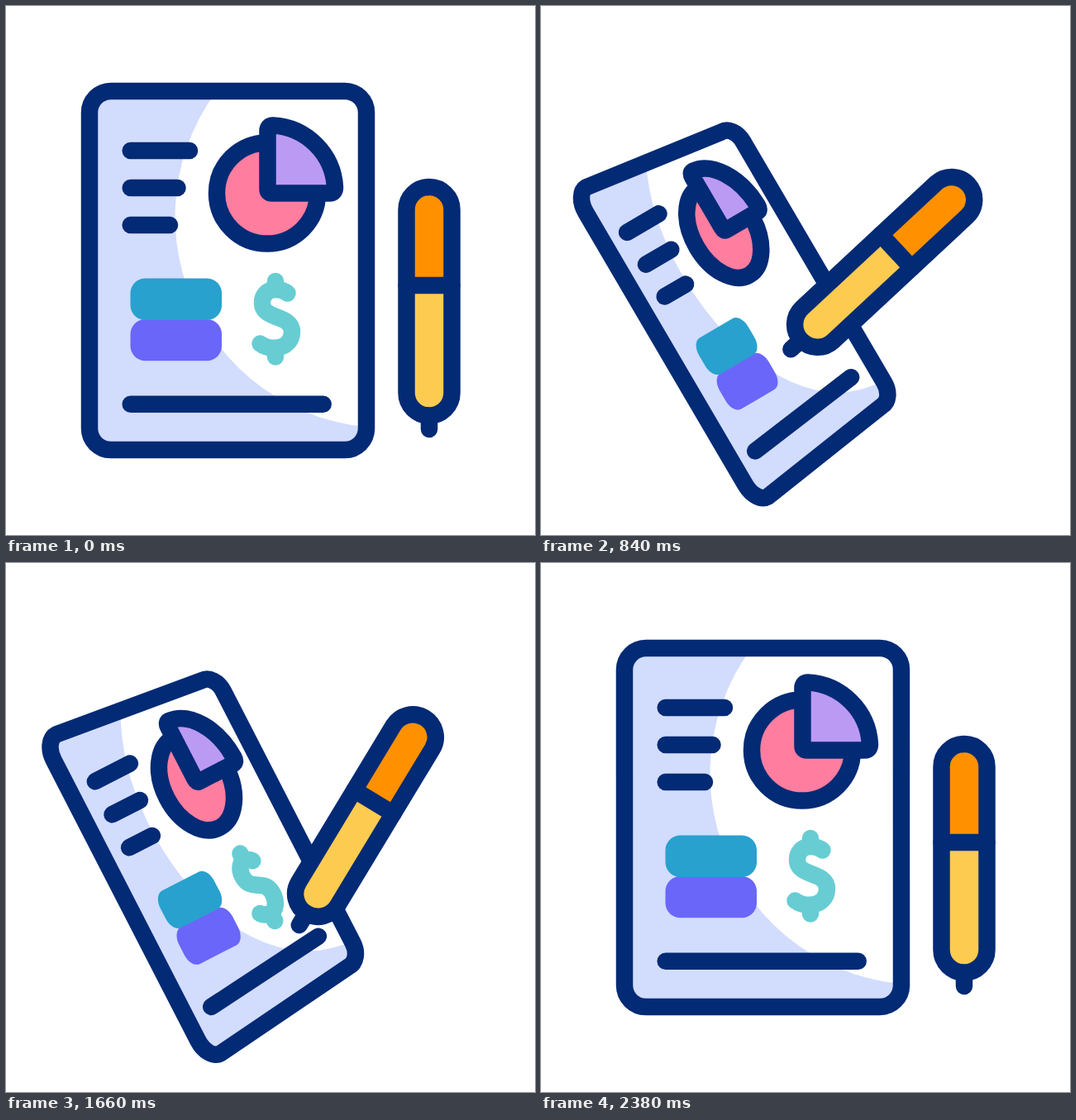
An HTML page for the animation above (2.4 s loop, 640 by 640 pixels).

```html
<!DOCTYPE html>
<html lang="en">
<head>
<meta charset="utf-8">
<title>Report and pen</title>
<style>
  html, body { margin: 0; width: 100%; height: 100%; overflow: hidden; background: #fff; }
  svg { display: block; width: 100vw; height: 100vh; }
  .ink { fill: none; stroke: #032a75; }
  .cash { fill: none; stroke: #67cdd3; }
</style>
</head>
<body>
<svg id="stage" viewBox="0 0 640 640" stroke-width="20.5" stroke-linecap="round" stroke-linejoin="round">
  <g id="doc"></g>
  <g id="pen">
    <rect x="484.5" y="219" width="55" height="276.5" rx="27.5" fill="#ff9100"/>
    <path d="M484.5 338V468a27.5 27.5 0 0 0 55 0V338z" fill="#fdcb50"/>
    <path class="ink" d="M512 496V512M484.5 338H539.5"/>
    <rect class="ink" x="484.5" y="219" width="55" height="276.5" rx="27.5"/>
  </g>
</svg>
<script>
const LOOP = 2400;
const TILT = 33.35;
const PIVOT = { x: 405, y: 450 };
const doc = document.getElementById('doc');
const pen = document.getElementById('pen');

const clamp = v => Math.min(1, Math.max(0, v));
const span = (t, from, to) => clamp((t - from) / (to - from));
const smooth = x => x * x * (3 - 2 * x);

// Symmetric cubic-bezier(a, 0, 1 - a, 1)
function ease(x, a = 0.74) {
  if (x <= 0 || x >= 1) return clamp(x);
  let lo = 0, hi = 1;
  for (let i = 0; i < 30; i++) {
    const s = (lo + hi) / 2, r = 1 - s;
    if (3 * a * s * r * r + 3 * (1 - a) * s * s * r + s * s * s < x) lo = s;
    else hi = s;
  }
  return smooth(lo);
}

// Local shaping of each kind of part; p runs from 0 (flat) to 1 (turned)
const squeeze = (x, p, mid = 373, cut = 0.414) => mid + (1 - cut * p) * (x - mid);
const flat = (x, y, p) => [squeeze(x, p), y];
const sheet = (x, y, p) =>
  [squeeze(x, p, 370.4, 0.418), y + 27.5 * p * clamp((x - 127) / 283) * (320 - y) / 217];
const light = (x, y, p) => sheet(x - 3 * p, y, p);
const footer = (x, y, p) => [squeeze(x, p), y - 20.2 * p * (x - 150.7) / 233];
const chart = (x, y, p) => [squeeze(x, p) - 1.5 * p, y + 7.5 * p];
const sign = (x, y, p) => [squeeze(x, p, 326, 0.44) + 19.5 * p, y];

function ellipse(cx, cy, r) {
  const k = r * 0.5523;
  const l = cx - r, R = cx + r, t = cy - r, b = cy + r;
  return `M${l} ${cy} C${l} ${cy - k} ${cx - k} ${t} ${cx} ${t} ` +
    `C${cx + k} ${t} ${R} ${cy - k} ${R} ${cy} C${R} ${cy + k} ${cx + k} ${b} ${cx} ${b} ` +
    `C${cx - k} ${b} ${l} ${cy + k} ${l} ${cy} Z`;
}

function roundRect(l, t, R, b, r) {
  const h = r * 0.4477;
  return `M${l + r} ${t} L${R - r} ${t} C${R - h} ${t} ${R} ${t + h} ${R} ${t + r} ` +
    `L${R} ${b - r} C${R} ${b - h} ${R - h} ${b} ${R - r} ${b} ` +
    `L${l + r} ${b} C${l + h} ${b} ${l} ${b - h} ${l} ${b - r} ` +
    `L${l} ${t + r} C${l} ${t + h} ${l + h} ${t} ${l + r} ${t} Z`;
}

// White area of the page, bounded on the left by a large circle
function glow() {
  const n = 28, from = 3.779, to = 1.665;
  let d = '';
  for (let i = 0; i <= n; i++) {
    const a = from + (to - from) * i / n;
    d += `${i ? 'L' : 'M'}${460 + 255.5 * Math.cos(a)} ${255 + 255.5 * Math.sin(a)} `;
  }
  return d + 'L436 129 L410 103 Z';
}

const parts = [];
function add(d, shape, attrs) {
  const el = document.createElementNS('http://www.w3.org/2000/svg', 'path');
  for (const key in attrs) el.setAttribute(key, attrs[key]);
  doc.appendChild(el);
  parts.push({ el, d, shape });
  return el;
}

const ink = { class: 'ink' };
const page = roundRect(101, 103, 436, 537, 26);
const wedge = 'M316.5 151 Q316.5 144.5 323 144.5 C363 146.5 396 179 398 219.5 ' +
  'Q398 226.5 391.5 226.5 L321.5 226.5 Q316.5 226.5 316.5 221.5 Z';

add(page, sheet, { fill: '#d2dcfd' });
add(glow(), light, { fill: '#fff' });
add(page, sheet, ink);
[[175, 222], [220, 207.5], [265, 198]].forEach(([y, x]) =>
  add(`M150.7 ${y} L${x} ${y}`, flat, ink));
add('M150.7 481.7 L383.7 481.7', footer, ink);
add(roundRect(150.5, 379, 261, 429.3, 18), flat, { fill: '#6a66fa' });
add(roundRect(150.5, 329.5, 261, 380, 18), flat, { fill: '#28a1ce' });
add(ellipse(316, 226.5, 61), chart, { fill: '#ff7d9f', stroke: '#032a75' });
add(wedge, chart, { fill: '#bb9af3', stroke: '#032a75' });

const strokes = [
  'M307.5 408.5 C312 412 318 414 326 413.7 C338 413 346 405 346 394 C346 387 341 381.5 333 378.5 ' +
  'L322 374 C316 371.5 310 368 310 359 C310 350 316 344 324 343 C330 342.5 335 343 340.5 347.5',
  'M326 424.5 L326 414',
  'M326 343 L326 333'
].map(d => add(d, sign, { class: 'cash', pathLength: 1 }));

function drawDoc(p) {
  const a = p * TILT * Math.PI / 180;
  const c = Math.cos(a), s = Math.sin(a);
  for (const { el, d, shape } of parts) {
    el.setAttribute('d', d.replace(/([\d.]+) ([\d.]+)/g, (_, x, y) => {
      const [lx, ly] = shape(+x, +y, p);
      const u = lx - PIVOT.x, v = ly - PIVOT.y - 32 * p;
      return `${(PIVOT.x + u * c + v * s).toFixed(2)} ${(PIVOT.y - u * s + v * c).toFixed(2)}`;
    }));
  }
}

function drawSign(t) {
  const writing = t > 1200;
  const from = writing ? 0 : ease(span(t, 0, 680));
  const to = writing ? ease(span(t, 1345, 1620)) : 1;
  const len = to - from;
  for (const el of strokes) {
    el.style.display = len > 0.005 ? '' : 'none';
    el.setAttribute('stroke-dasharray', `${to === 1 ? len + 0.02 : len} 3`);
    el.setAttribute('stroke-dashoffset', -from);
  }
}

function drawPen(t) {
  const k = ease(span(t, 0, 900)) * (1 - ease(span(t, 1490, 1864)));
  const right = smooth(span(t, 860, 1130));
  const left = span(t, 1130, 1490);
  const dx = -102.3 + 19.5 * right - 40 * smooth(left);
  const dy = -50 + 5 * right - 35 * left * left;
  pen.setAttribute('transform', `translate(${dx * k} ${dy * k}) rotate(${47.2 * k} 512 365)`);
}

function render(t) {
  drawDoc(t < 1200 ? ease(t / 1200) : 1 - ease((t - 1200) / 1200));
  drawSign(t);
  drawPen(t);
}

let start = null;
function tick(now) {
  if (start === null) start = now;
  render((now - start) % LOOP);
  requestAnimationFrame(tick);
}
render(0);
requestAnimationFrame(tick);
</script>
</body>
</html>
```
